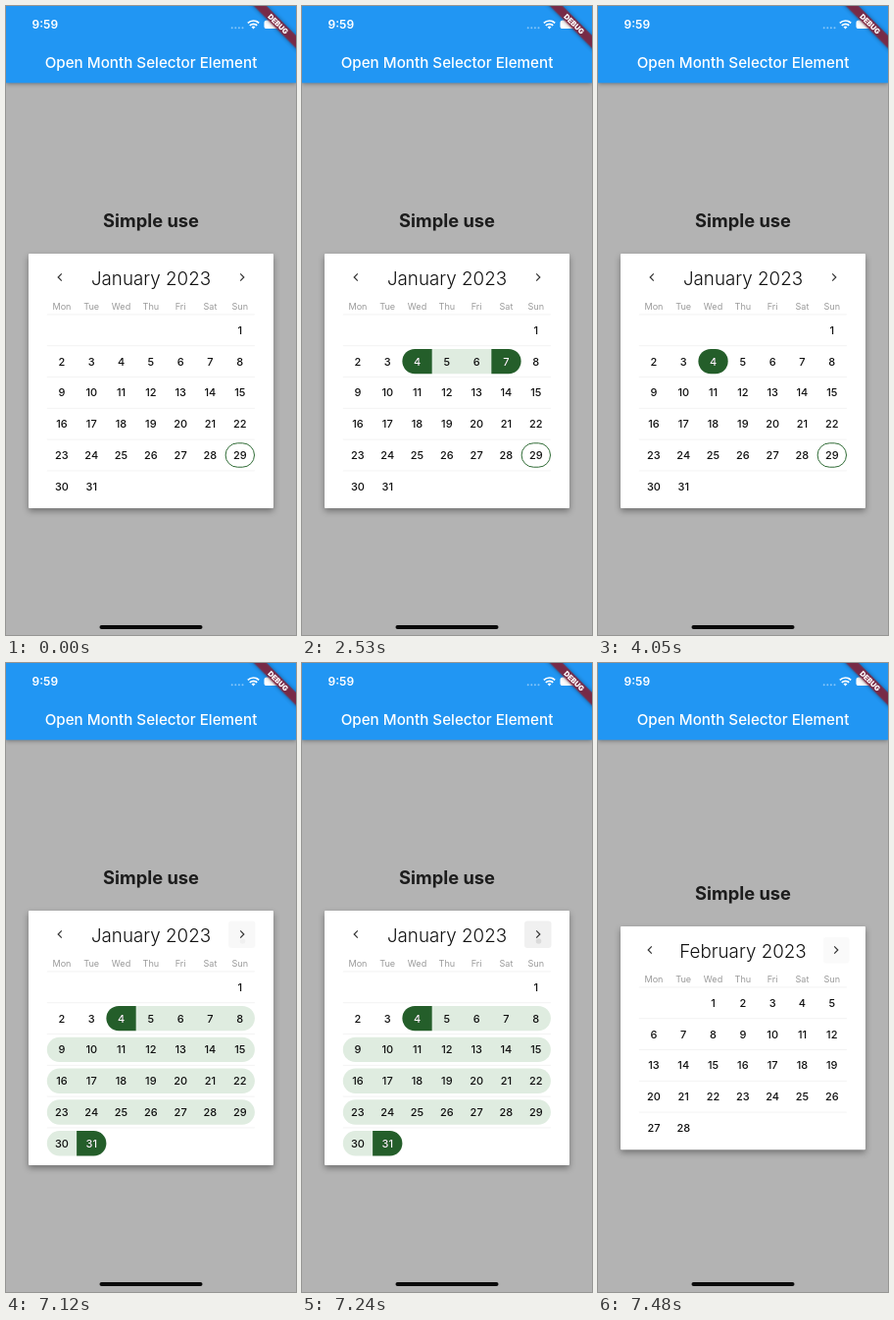
Recreate the animation shown at these times as an HTML page. Size 296 by 640 pixels, loop 8 s.

```html
<!DOCTYPE html>
<html lang="en">
<head>
<meta charset="utf-8">
<title>Calendar range selection</title>
<style>
  html, body { margin: 0; width: 100%; height: 100%; overflow: hidden; background: #b3b3b3; }
  svg { display: block; width: 100vw; height: 100vh; font-family: Inter, Roboto, sans-serif; }
  text { text-anchor: middle; }
  .bar { fill: #2196f3; filter: drop-shadow(0 1.5px 2px rgba(0, 0, 0, .35)); }
  .card { fill: #fff; filter: drop-shadow(0 3px 3px rgba(0, 0, 0, .36)); }
  .heading { font-size: 18.3px; font-weight: 700; fill: #1c1c1c; }
  .month { font-size: 18.8px; font-weight: 300; fill: #111; }
  .weekday { font-size: 9.1px; fill: #9a9a9a; }
  .day { font-size: 11px; font-weight: 500; fill: #111; }
  .day.picked { fill: #fff; }
  .rule { stroke: #f3f3f3; }
  .chevron { fill: none; stroke: #333; stroke-width: 1.2; }
  .dark { fill: #245e2a; }
  .light { fill: #dfece0; }
  .ring { fill: none; stroke: #2f6b35; }

  .january, .february, .today, .single, .week, .long, .press, .release {
    animation: 8s step-end infinite;
  }
  .january { animation-name: january; }
  .february { animation-name: february; }
  .today { animation-name: today; }
  .single { animation-name: single; }
  .week { animation-name: week; }
  .long { animation-name: long; }
  .press { animation-name: press; }
  .release { animation-name: release; }
  @keyframes january { 0% { visibility: visible } 92%, 100% { visibility: hidden } }
  @keyframes february { 0% { visibility: hidden } 92%, 100% { visibility: visible } }
  @keyframes today { 0% { opacity: 1 } 71.5%, 100% { opacity: 0 } }
  @keyframes single {
    0%, 31.625%, 71.5%, 100% { opacity: 0 }
    15.75%, 50.625% { opacity: 1 }
  }
  @keyframes week { 0%, 50.625%, 100% { opacity: 0 } 31.625% { opacity: 1 } }
  @keyframes long { 0% { opacity: 0 } 71.5%, 100% { opacity: 1 } }
  @keyframes press { 0% { opacity: 0 } 89% { opacity: .4 } 90.5%, 100% { opacity: 1 } }
  @keyframes release { 0% { opacity: 0 } 92% { opacity: 1 } 93.5%, 100% { opacity: .25 } }
</style>
</head>
<body>
<svg id="stage" viewBox="0 0 296 640"></svg>
<script>
const LEFT = 41.8, CELL = 30.3, ROW = 31.8, PILL = 25.4;
const WEEKDAYS = ['Mon', 'Tue', 'Wed', 'Thu', 'Fri', 'Sat', 'Sun'];
const range = (n, make) => Array.from({ length: n }, (_, i) => make(i)).join('');
const label = (cls, x, y, text) => `<text class="${cls}" x="${x}" y="${y}">${text}</text>`;
const centerX = col => LEFT + CELL * (col + .5);
const chevron = (x, y, dir) =>
  `<path class="chevron" d="M${x - 1.8 * dir} ${y - 3.6}l${3.6 * dir} 3.6l${-3.6 * dir} 3.6"/>`;

function createMonth(name, title, top, firstCol, days, arrowGap) {
  const rows = Math.ceil((firstCol + days) / 7);
  const firstY = top + 77.8;
  const place = day => {
    const index = firstCol + day - 1;
    return { col: index % 7, y: firstY + ROW * Math.floor(index / 7) };
  };
  const number = (day, cls = '') => {
    const { col, y } = place(day);
    return label('day ' + cls, centerX(col), y + 4, day);
  };

  // A strip of cells within one row, rounded at the chosen ends.
  const strip = (cls, from, to, roundLeft = true, roundRight = true) => {
    const { col, y } = place(from);
    const r = PILL / 2, x = LEFT + CELL * col, w = CELL * (to - from + 1);
    const a = roundLeft ? r : 0, b = roundRight ? r : 0;
    return `<path class="${cls}" d="M${x + a} ${y - r}h${w - a - b}` +
      `a${b} ${b} 0 0 1 0 ${PILL}h${a + b - w}` +
      (a ? `a${a} ${a} 0 0 1 0 ${-PILL}` : '') + 'z"/>';
  };

  const draw = (beneath, above) => `<g class="${name}">
    ${label('heading', 148, top - 27.2, 'Simple use')}
    <rect class="card" x="23" y="${top}" width="250" height="${rows * ROW + 68.2}" rx="1"/>
    ${beneath}
    ${chevron(148 - arrowGap, top + 24, -1)}${chevron(148 + arrowGap, top + 24, 1)}
    ${label('month', 148, top + 32.3, title)}
    ${WEEKDAYS.map((day, i) => label('weekday', centerX(i), top + 56.5, day)).join('')}
    ${range(rows, i => {
      const y = firstY + ROW * (i - .5);
      return `<path class="rule" d="M${LEFT} ${y}h${CELL * 7}"/>`;
    })}
    ${above(strip, number, place)}
    ${range(days, i => number(i + 1))}
    ${name === 'january' ? pickedNumbers(number) : ''}
  </g>`;
  return draw;
}

const pickedNumbers = number =>
  [['single', 4], ['week', 4], ['week', 7], ['long', 4], ['long', 31]]
    .map(([layer, day]) => number(day, 'picked ' + layer)).join('');

const selections = (strip, number, place) => {
  const { col, y } = place(29);
  return `
    <rect class="ring today" x="${LEFT + CELL * col + .5}" y="${y - 12.2}" width="29.4" height="24.4" rx="12.2"/>
    <g class="single">${strip('dark', 4, 4)}</g>
    <g class="week">
      ${strip('light', 5, 6, false, false)}
      ${strip('dark', 4, 4, true, false)}${strip('dark', 7, 7, false, true)}
    </g>
    <g class="long">
      ${strip('light', 5, 8, false, true)}
      ${range(3, i => strip('light', 9 + 7 * i, 15 + 7 * i))}
      ${strip('light', 30, 30, true, false)}
      ${strip('dark', 4, 4, true, false)}${strip('dark', 31, 31, false, true)}
    </g>`;
};

const pressed = `<g class="press">
  <rect x="227" y="262.5" width="27.5" height="27.5" rx="3" fill="#f0f0f0"/>
  <circle cx="241.5" cy="283" r="2.8" fill="#dadada"/>
</g>`;
const released = `<rect class="release" x="230" y="279" width="26.5" height="26.5" rx="3" fill="#ebebeb"/>`;

const statusBar = `
  <rect class="bar" width="296" height="78.3"/>
  <g fill="#fff">
    <text x="39.8" y="23.3" font-size="12" font-weight="600">9:59</text>
    <g opacity=".45">${range(4, i => `<circle cx="${230.7 + 3.6 * i}" cy="22.3" r="1"/>`)}</g>
    <path d="M252.5 23.5l-2-2.2a3 3 0 0 1 4 0z"/>
    <g fill="none" stroke="#fff" stroke-width="1.7">
      <path d="M248.8 19.8a5.3 5.3 0 0 1 7.4 0"/>
      <path d="M246.8 17.3a8.2 8.2 0 0 1 11.4 0"/>
    </g>
    <rect x="263.5" y="14.5" width="17" height="8.6" rx="2.6"/>
    <rect x="281.3" y="17.3" width="1.2" height="3" rx=".6" opacity=".6"/>
    <text x="148" y="62.7" font-size="15.2" font-weight="500">Open Month Selector Element</text>
  </g>`;

const banner = `<g transform="translate(296 0) rotate(45)">
  <rect x="-40" y="21.2" width="80" height="9.2" fill="#82253f" fill-opacity=".9"
    style="filter:drop-shadow(0 0 2px rgba(0,0,0,.45))"/>
  <text y="28.6" font-size="7.4" font-weight="900" fill="#fff">DEBUG</text>
</g>`;

const january = createMonth('january', 'January 2023', 252, 6, 31, 93);
const february = createMonth('february', 'February 2023', 268, 2, 28, 95);

document.getElementById('stage').innerHTML = `
  <rect width="296" height="640" fill="#b3b3b3"/>
  ${statusBar}
  ${january(pressed, selections)}
  ${february(released, () => '')}
  <rect x="95.5" y="630" width="105" height="4" rx="2" fill="#0a0a0a"/>
  ${banner}`;
</script>
</body>
</html>
```
